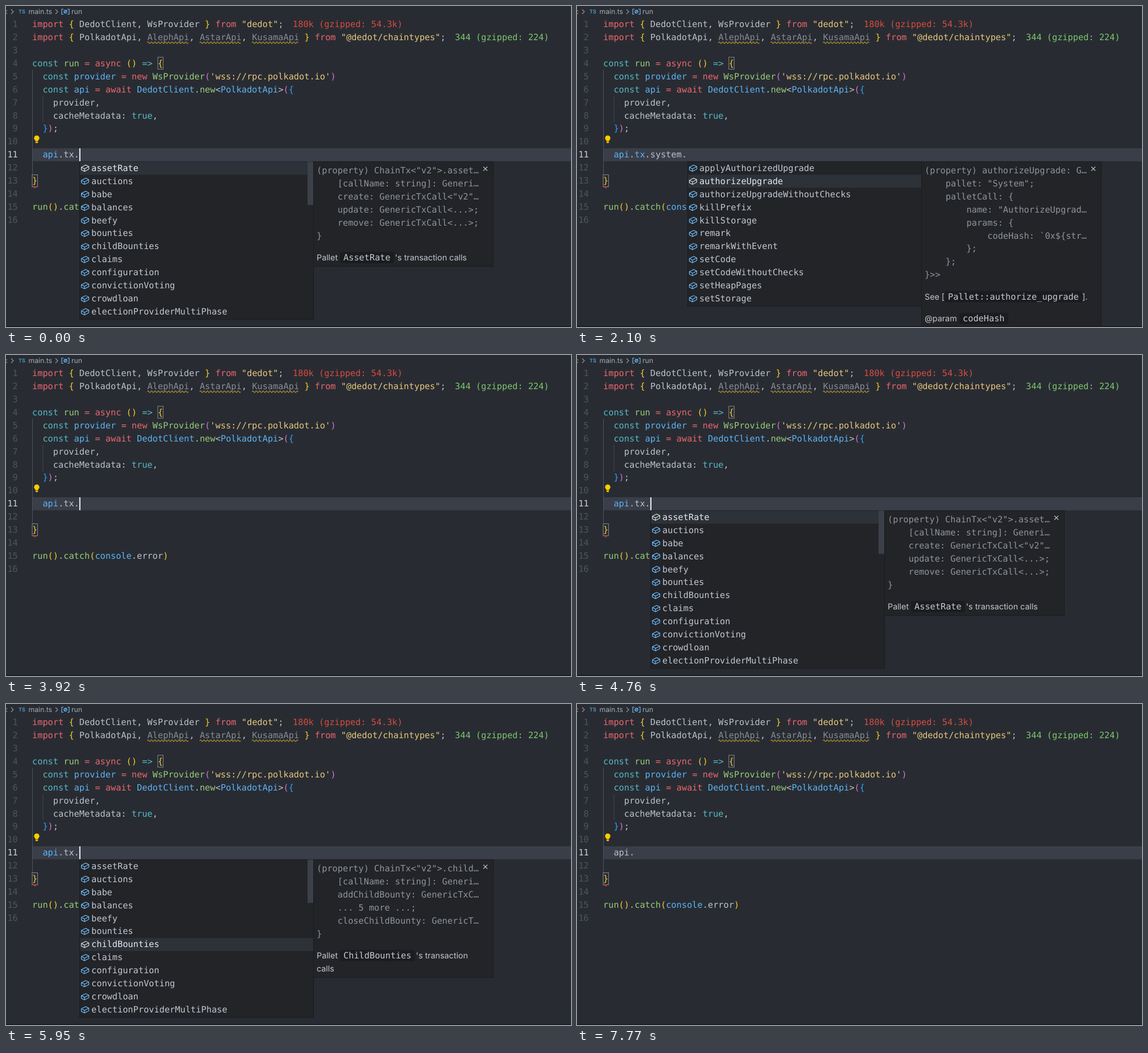
Recreate the animation shown at these times as an HTML page. Size 993x564 px, loop 8 s.

```html
<!DOCTYPE html>
<html lang="en">
<head>
<meta charset="utf-8">
<title>Editor completion</title>
<style>
  html, body { margin: 0; width: 100%; height: 100%; overflow: hidden; background: #282c32; }
  svg { display: block; width: 993px; height: 564px; }
  text { white-space: pre; text-rendering: geometricPrecision; font-variant-ligatures: none; }
  .m { font: 15.28px "DejaVu Sans Mono", monospace; }
  .s { font: 14.3px Inter, sans-serif; }
  .b { font: 12.2px Inter, sans-serif; }
</style>
</head>
<body>
<svg viewBox="0 0 993 564">
  <rect width="993" height="564" fill="#282c32"/>
  <g id="base"></g>
  <g id="live"></g>
  <rect y="562" width="993" height="2" fill="#1d1b23"/>
</svg>
<script>
const LOOP = 8000, LEFT = 46, CW = 9.2, LH = 22.93, BLINK = 490;
const COLORS = {
  w: '#bcc2cc', r: '#ee6670', b: '#5fb2f5', g: '#98cb7b', c: '#55b9c6', y: '#e8c67e',
  d: '#868c97', G: '#f5cc2e', P: '#d873d3', B: '#2f9dfa', R: '#d94b41', L: '#7fc66f'
};

// ~x switches to colour x
const CODE = [
  '~rimport ~G{~w DedotClient, WsProvider ~G}~r from ~y"dedot"~w;',
  '~rimport ~G{~w PolkadotApi, ~dAlephApi~w, ~dAstarApi~w, ~dKusamaApi ~G}~r from ~y"@dedot/chaintypes"~w;',
  '',
  '~cconst ~grun ~r= async ~G() ~c=> ~G{',
  '  ~cconst ~bprovider ~r= new ~gWsProvider~P(~y\'wss://rpc.polkadot.io\'~P)',
  '  ~cconst ~bapi ~r= await ~bDedotClient~w.~gnew~w<~bPolkadotApi~w>~P(~B{',
  '    ~wprovider,',
  '    ~wcacheMetadata: ~ctrue~w,',
  '  ~B}~P)~w;',
  '', '', '',
  '~G}',
  '',
  '~grun~G()~w.~gcatch~G(~bconsole~w.error~G)',
  ''
];

const esc = s => s.replace(/&/g, '&amp;').replace(/</g, '&lt;');
const text = (x, y, s, fill, cls = 'm', extra = '') =>
  `<text class="${cls}" x="${x}" y="${y}" fill="${fill}" ${extra}>${esc(s)}</text>`;
const rect = (x, y, w, h, fill, extra = '') =>
  `<rect x="${x}" y="${y}" width="${w}" height="${h}" fill="${fill}" ${extra}/>`;
const line = (d, stroke, w = 1) => `<path d="${d}" fill="none" stroke="${stroke}" stroke-width="${w}"/>`;
const base = n => 37 + LH * (n - 1);
const colX = c => LEFT + c * CW;

function tokens(src, n) {
  let col = 0, out = '', color = 'w';
  for (const part of src.split(/(~\w)/)) {
    if (/^~\w$/.test(part)) { color = part[1]; continue; }
    const word = part.trimStart(), lead = part.length - word.length;
    if (word) out += text(colX(col + lead), base(n), word, COLORS[color]);
    col += part.length;
  }
  return out;
}

function wave(x, w, y, color) {
  let d = `M${x} ${y}`;
  for (let i = 0; i + 3 <= w; i += 3) d += `q1.5 ${i % 2 ? 3 : -3} 3 0`;
  return line(d, color, 1.2);
}

function drawBase() {
  let s = rect(LEFT, 250, 947, 22.8, '#393e49');
  s += text(-4, 14, 'c', '#a0a6b0', 'b') + line('M9 6l4 4-4 4M87 6l4 4-4 4', '#9097a2', 1.2);
  s += text(22, 13, 'TS', '#4f9fd8', 'b', 'style="font-size:9px;font-weight:600"');
  s += text(39.5, 14, 'main.ts', '#a6acb6', 'b') + text(115, 14, 'run', '#a6acb6', 'b');
  s += line('M101 5.5h-3v9h3M108 5.5h3v9h-3M102 12l5-4.5', '#6cb4f2', 1.2);
  s += '<circle cx="104.5" cy="10" r="2.6" fill="none" stroke="#6cb4f2" stroke-width="1.1"/>';
  s += line('M46.5 112V296', '#4d535f') + line('M64.9 158V204', '#41464f');
  CODE.forEach((src, i) => {
    const n = i + 1;
    s += text(20.8, base(n), String(n), n === 11 ? '#ccd1d9' : '#4c5462', 'm', 'text-anchor="end"');
    s += tokens(src, n);
  });
  s += text(504, base(1), '180k (gzipped: 54.3k)', COLORS.R);
  s += text(789, base(2), '344 (gzipped: 224)', COLORS.L);
  for (const [c, len] of [[22, 8], [32, 8], [42, 9]]) s += wave(colX(c), len * CW, 64.5, '#c9a031');
  const box = 'stroke="#868a90" stroke-width="1"';
  s += rect(266.8, 90, 9.4, 21, 'none', box) + rect(46, 296.5, 9.4, 21, 'none', box);
  return s;
}

// Timelines: [start, value]
const TYPED = [[0, 'api.tx.'], [210, 'api.tx.s'], [490, 'api.tx.sy'], [1400, 'api.tx.system'],
  [1610, 'api.tx.system.'], [3710, 'api.tx.system'], [3780, 'api.tx.'], [4340, 'api.tx'],
  [4550, 'api.tx.'], [6860, 'api.tx'], [7140, 'api.']];
const LIST = [[0, 'tx'], [210, 's'], [490, 'sy'], [1400, ''], [1680, 'system'], [3710, ''], [4620, 'tx'], [6860, '']];
const DETAIL = [[0, 1], [1400, 0], [1820, 1], [3710, 0], [4690, 1], [6860, 0]];
const PICK = [[0, 0], [2100, 1], [2240, 2], [2450, 3], [2660, 4], [2800, 5], [3010, 6], [3430, 5], [3710, 0],
  [4970, 1], [5180, 2], [5390, 3], [5530, 4], [5670, 5], [5880, 6], [6090, 7], [6230, 8], [6440, 9]];
const BULB = [[0, 1], [210, 0], [1120, 1], [1400, 0], [1820, 1], [3710, 0], [3920, 1], [4340, 0],
  [4760, 1], [6860, 0], [7700, 1]];
const ERROR = [[0, 1], [840, 0], [1960, 1]];
const WAKE = [0, 210, 490, 1400, 1610, 3850, 4340, 4690, 6860, 7140].map(t => [t, t]);
const at = (steps, t) => steps.reduce((v, s) => s[0] <= t ? s[1] : v, steps[0][1]);

const ITEMS = {
  tx: 'assetRate auctions babe balances beefy bounties childBounties claims configuration convictionVoting crowdloan electionProviderMultiPhase',
  s: 'scheduler session slots staking stateTrieMigration system assetRate auctions balances bounties childBounties claims',
  sy: 'system treasury',
  system: 'applyAuthorizedUpgrade authorizeUpgrade authorizeUpgradeWithoutChecks killPrefix killStorage remark remarkWithEvent setCode setCodeWithoutChecks setHeapPages setStorage'
};
for (const k in ITEMS) ITEMS[k] = ITEMS[k].split(' ');

const CALL = ': GenericTxCall<"v2", (...)>;', SHORT = ': GenericTxCall<...>;';
const PALLETS = {
  assetRate: ['create' + CALL, 'update' + SHORT, 'remove' + SHORT],
  auctions: ['newAuction' + CALL, 'bid' + SHORT, 'cancelAuction' + SHORT],
  babe: ['reportEquivocation' + CALL, '... 1 more ...;', 'planConfigChange' + SHORT],
  balances: ['transferAllowDeath' + CALL, '    ...;', '}>>;', '... 6 more ...;', 'forceAdjustTotalIssuance' + CALL],
  beefy: ['reportEquivocation' + CALL, '... 1 more ...;', 'setNewGenesis' + SHORT],
  bounties: ['proposeBounty' + CALL, '... 7 more ...;', 'extendBountyExpiry' + SHORT],
  childBounties: ['addChildBounty' + CALL, '... 5 more ...;', 'closeChildBounty' + SHORT],
  claims: ['claim' + CALL, '... 3 more ...;', 'moveClaim' + SHORT],
  configuration: ['setCodeRetentionPeriod' + CALL, '    ...;', '}>>;', '... 44 more ...;', 'setSchedulerParams' + CALL],
  convictionVoting: ['vote' + CALL, '... 4 more ...;', 'removeOtherVote' + CALL],
  scheduler: ['schedule' + CALL, '... 4 more ...;', 'cancelRetry' + SHORT],
  system: ['remark' + CALL, '    pallet: "System";', '    palletCall: {', '        name: "Remark";',
    '        params: {', '            ...;', '        };', '    };', '}>>;', '... 9 more ...;',
    'applyAuthorizedUpgrade' + CALL]
};
const PARAMS = ['code: BytesLike;', 'codeHash: `0x${string}`;', 'codeHash: `0x${string}`;', 'prefix: BytesLike;',
  'keys: Array<BytesLike>;', 'remark: BytesLike;', 'remark: BytesLike;', 'code: BytesLike;'];
const upper = s => s[0].toUpperCase() + s.slice(1);
const snake = s => s.replace(/[A-Z]/g, c => '_' + c.toLowerCase());
const cut = s => s.length > 31 ? s.slice(0, 30) + '…' : s;

function chip(x, y, s) {
  const w = s.length * CW;
  return rect(x - 6, y - 15, w + 12, 20, '#1a1c20', 'rx="3"') + text(x, y, s, '#c6cad1');
}

function detail(x, list, pick) {
  const name = ITEMS[list][pick], member = list === 'system';
  const lines = member
    ? [`(property) ${name}: GenericTxCall`, '    pallet: "System";', '    palletCall: {',
       `        name: "${upper(name)}";`, '        params: {', '            ' + PARAMS[pick],
       '        };', '    };', '}>>']
    : [`(property) ChainTx<"v2">.${name}`, '    [callName: string]: GenericTxCall',
       ...PALLETS[name].map(s => '    ' + s), '}'];
  const tx = x + 6, y = 294 + 22.9 * (lines.length - 1) + 38.6, fg = '#c3c7ce';
  let bottom = y + 10, s = '';
  if (member) {
    const ref = 'Pallet::' + snake(name), arg = PARAMS[pick].split(':')[0];
    s += text(tx, y, 'See [', fg, 's') + chip(tx + 41, y, ref) + text(tx + 47 + ref.length * CW, y, '].', fg, 's');
    s += text(tx, y + 38.3, '@param', fg, 's', 'font-style="italic"') + chip(tx + 67, y + 38.3, arg);
    bottom += 39;
  } else {
    const title = upper(name), end = tx + 47 + title.length * CW + 8, wrap = title.length > 12;
    s += text(tx, y, 'Pallet', fg, 's') + chip(tx + 47, y, title);
    s += text(end, y, "'s transaction" + (wrap ? '' : ' calls'), fg, 's');
    if (wrap) { s += text(tx, y + 23, 'calls', fg, 's'); bottom += 23; }
  }
  const code = lines.map((l, i) => text(tx, 294 + 22.9 * i, cut(l), '#8f949c')).join('');
  const cx = x + 302.5;
  return rect(x + .5, 273.5, 316, bottom - 273, '#222428', 'stroke="#191b1f"') + code + s +
    line(`M${cx - 3.5} 282.5l7 7m0-7l-7 7`, '#b9bec6', 1.2);
}

function itemText(x, y, name, list, on) {
  const keys = list === 's' || list === 'sy' ? list : '';
  let k = 0, out = '';
  for (const ch of name) {
    const hit = k < keys.length && ch === keys[k];
    if (hit) k++;
    out += hit ? `<tspan font-weight="700">${ch}</tspan>` : ch;
  }
  return `<text class="m" x="${x}" y="${y}" fill="${on ? '#e6e9ee' : '#c3c8d0'}">${out}</text>`;
}

function popup(x, list, pick, more) {
  const items = ITEMS[list], h = items.length * LH + 2;
  let s = rect(x + .5, 273.5, 411, h, '#222428', 'stroke="#191b1f"');
  items.forEach((name, i) => {
    const top = 273.5 + i * LH, on = i === pick;
    if (on) s += rect(x + 1, top, 410, LH, '#2d3239');
    s += `<g transform="translate(${x + 2} ${top + 3.5})">` +
      line('M1.5 6.3 9 2.5 14.5 5.2V9.7L7 13.5 1.5 10.8ZM1.5 6.3 7 9 14.5 5.2M7 9V13.5',
        on ? '#d5dae2' : '#6fb9f6', 1.2) + '</g>';
    s += itemText(x + 21, 289.8 + i * LH, name, list, on);
  });
  if (items.length > 11) s += rect(x + 401, 273.5, 10, 76, '#3b4049');
  return s + (more ? detail(x + 411, list, pick) : '');
}

const BULB_ART = '<path d="M54 227.5a4.6 4.6 0 0 1 2.6 8.4v1.6h-5.2v-1.6a4.6 4.6 0 0 1 2.6-8.4z" fill="#fc0"/>' +
  rect(51.8, 238.3, 4.4, 2.4, '#fc0', 'rx="1"');

function scene(st) {
  const end = colX(2 + st.typed.length);
  // an object followed by a named member is blue
  const typed = st.typed.replace(/\w+(?=\.\w)/g, '~b$&~w');
  let s = tokens('  ~w' + typed, 11);
  if (st.error) s += wave(46, 10, 318.5, '#e0453c');
  if (st.bulb) s += BULB_ART;
  if (st.list) s += popup(Math.round(end + .6), st.list, st.pick, st.more);
  if (st.caret) s += rect(end, 250, 2, 22.8, '#f2f4f8');
  return s;
}

const live = document.getElementById('live');
document.getElementById('base').innerHTML = drawBase();
let last = '';

function render(t) {
  const st = {
    typed: at(TYPED, t), list: at(LIST, t), more: at(DETAIL, t), pick: at(PICK, t),
    bulb: at(BULB, t), error: at(ERROR, t),
    caret: Math.floor((t - at(WAKE, t)) / BLINK) % 2 === 0
  };
  const key = JSON.stringify(st);
  if (key !== last) { last = key; live.innerHTML = scene(st); }
}

const start = performance.now();
function tick() {
  render((performance.now() - start) % LOOP);
  requestAnimationFrame(tick);
}
tick();
</script>
</body>
</html>
```
